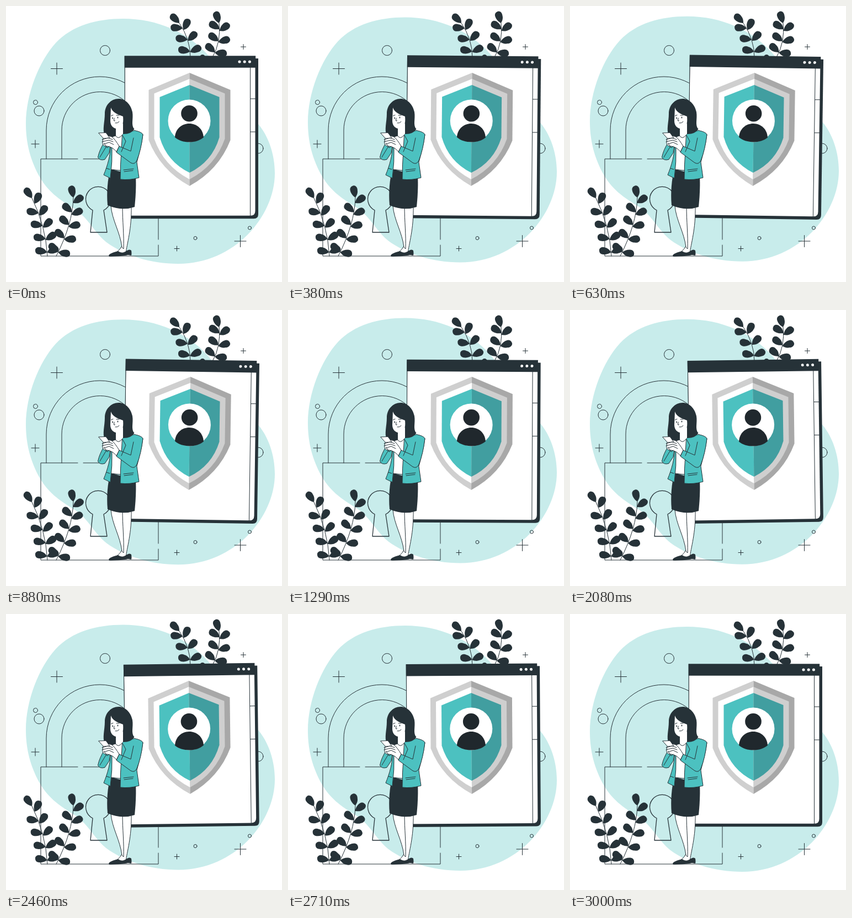
An HTML page that plays this animation: 500 by 500 pixels, repeating every 3.04 s.

```html
<!DOCTYPE html>
<html lang="en">
<head>
<meta charset="utf-8">
<title>Account security</title>
<style>
  html, body { margin: 0; width: 100%; height: 100%; overflow: hidden; background: #fff; }
  svg { display: block; width: 100vw; height: 100vh; }
  .line, .skin, .coat { stroke: #263238; stroke-width: 1; stroke-linecap: round; stroke-linejoin: round; }
  .line { fill: none; }
  .skin { fill: #fff; }
  .coat { fill: #4cc1c0; }
  .dark { fill: #263238; }
</style>
</head>
<body>
<svg viewBox="0 0 500 500">
  <defs>
    <path id="leaf" class="dark" d="M0 0C4-4 9-7 15-7C20-7 22-3 22 1C21 5 17 7 12 6C7 6 3 3 0 0Z"/>
  </defs>

  <path id="blob" fill="#c8eceb" d="M36 213C36 160 60 100 90 67C120 35 165 23 212 23C275 23 330 48 367 90C395 125 430 185 457 214C475 235 487 268 487 303C487 380 415 467 312 467C262 467 215 452 182 428C158 408 150 385 125 368C95 350 75 335 60 308C45 280 36 250 36 213Z"/>

  <g id="marks" class="line"></g>

  <g class="line">
    <path d="M130 277H63V453H276V433M276 423V380M140 277H176"/>
    <path d="M73 277V225A97 97 0 0 1 267 225M101 277V225A69.500 69.500 0 0 1 240 225"/>
    <path stroke-width="1.3" d="M157 370A22.500 22.500 0 1 1 177 370L183 410H153Z"/>
  </g>

  <g id="plants"></g>
  <circle class="dark" cx="356" cy="93" r="5"/>

  <g id="window">
    <path class="dark" d="M215 95H457V377Q457 385.300 449 385.300H215Z"/>
    <path fill="#fff" d="M215.500 110H451.500V371Q451.500 379.800 443 379.800H215.500Z"/>
    <path class="line" d="M215.200 91V384M442.500 111V380M442.500 168H452M442.500 228H452"/>
    <rect class="dark" x="214.700" y="90.300" width="237.500" height="21.400"/>
    <g id="dots" fill="#fff"></g>
    <g id="shield"></g>
    <circle cx="332" cy="208" r="38.500" fill="#fff"/>
    <g fill="#20282d">
      <circle cx="332" cy="194.800" r="14.800"/>
      <path d="M306 238C307 222 319 213 332 213S357 222 358 238C351 244 342 246.500 332 246.500S313 244 306 238Z"/>
    </g>
  </g>

  <g id="woman">
    <g id="legs">
      <path class="skin" d="M208 364C208 388 214 410 212 430Q208 441 199 447L217 449C219 430 228 405 227 362Z"/>
      <path class="skin" d="M190 362C192 388 207 410 210 437L213 440C214 415 211 390 211 362Z"/>
      <path class="dark" d="M186 452C188 448 196 446 203 444Q210 449 216 445Q224 439 227 443Q228 449 227 452L221 451C214 453 196 454 187 454Z"/>
    </g>
    <path class="dark" d="M189 295L235 308C236 325 235 345 233 364Q210 372 184 361C182 338 184 315 189 295Z"/>
    <g id="jacket">
      <path class="skin" d="M191 240L198 230L212 229L218 250L208 298L189 296Z"/>
      <path class="coat" d="M178 247Q169 261 166.500 274Q170 281 179 278L187 266L189 251Z"/>
      <path class="coat" d="M190 252C189 271 184 289 177 306L189 312Q193 282 192 253Z"/>
      <path class="coat" d="M211 230Q225 227 233 225.500Q246 228 248 233C246 250 241 268 237 283L241 311Q224 316 207 314Q207 288 209 262Z"/>
      <path class="coat" d="M248 233Q245 260 237 280Q233 288 226 284L200 265L205 254L226 263L231 239"/>
      <path class="line" d="M213 297L231 295M214 300L230 298M182 294L188 296M170 274L182 254M211 234L217 245L209 264"/>
    </g>
    <g id="head">
      <path class="dark" d="M204 168C190 168 179 180 179 195C179 210 174 225 179 234Q186 241 197 236L213 232Q227 232 232.500 223C226 216 231 205 229 192C226 178 216 168 204 168Z"/>
      <path fill="#fff" d="M199 219L212 213V231Q207 243 199 240Z"/>
      <path fill="#fff" d="M190 184C193 193 203 197 212 200Q214 221 203 222C196 223 189 218 189 208Z"/>
      <path class="line" d="M198 234Q203 244 211 233M190.500 199L194 197.500M200 198L205 198M196 203L195.500 208H197.500M198 212Q202 213 205 209.500"/>
      <ellipse class="dark" cx="193" cy="203" rx=".9" ry="1.500"/>
      <ellipse class="dark" cx="202.500" cy="202" rx=".9" ry="1.500"/>
    </g>
    <g id="hands">
      <path class="skin" d="M176 240Q184 233 192 237Q198 242 205 254L200 264Q193 255 183 254Q176 255 175 249Z"/>
      <path class="skin" d="M168 230L181 229.500L188 239L177 240Z"/>
      <path class="line" d="M174 242L185 239L193 242M174 246L186 243L194 246M177 250L187 247L195 251M178 249L183 257L187 254"/>
    </g>
  </g>
</svg>
<script>
const PERIOD = 3000, LOOP = 3040;
const $ = id => document.getElementById(id);
const repeat = (n, fn) => Array.from({ length: n }, (_, i) => fn(i)).join('');

const plus = (x, y, r) => `<path d="M${x - r} ${y}h${2 * r}M${x} ${y - r}v${2 * r}"/>`;
const ring = (x, y, r) => `<circle cx="${x}" cy="${y}" r="${r}"/>`;

// One half of a shield layer; each layer is inset evenly from the one outside it.
function shieldHalf(layer, side, color) {
  const x = half => 332.5 + side * half;
  const width = 74 - 10 * layer;
  return `<path fill="${color}" d="M332.5 ${121 + 11 * layer}L${x(width)} ${152 + 6.5 * layer}` +
    `V${243 - 2.5 * layer}Q${x(53 - 6 * layer)} ${297 - 7.5 * layer} 332.5 ${326 - 12 * layer}Z"/>`;
}

// A stem is a quadratic curve from root through bend to tip, with leaves in pairs that close towards the tip.
function plant(root, bend, tip, pairs, first, step) {
  const at = t => [0, 1].map(k =>
    (1 - t) ** 2 * root[k] + 2 * t * (1 - t) * bend[k] + t * t * tip[k]);
  const heading = t => {
    const [dx, dy] = [0, 1].map(k => (1 - t) * (bend[k] - root[k]) + t * (tip[k] - bend[k]));
    return Math.atan2(dy, dx) * 180 / Math.PI;
  };
  const leaf = ([x, y], angle) =>
    `<use href="#leaf" transform="translate(${x} ${y}) rotate(${angle})"/>`;
  const pair = i => {
    const t = first + step * i, spread = 75 - 25 * t;
    const left = t < 0.85 ? leaf(at(t * 1.06), heading(t) - spread) : '';
    return left + leaf(at(t), heading(t) + spread);
  };
  return `<path class="line" d="M${root}Q${bend} ${tip}"/>` +
    repeat(pairs, pair) + leaf(tip, heading(1.3));
}

$('marks').innerHTML =
  plus(92, 113.5, 10.5) + plus(424.5, 426, 10.5) + plus(53, 250, 7) +
  plus(430, 74, 4.5) + plus(309.5, 439.5, 4.5) +
  ring(179.5, 80.5, 9) + ring(60, 190, 9) + ring(457, 258, 9) +
  ring(53.5, 174.5, 4) + ring(343, 420.5, 3) + ring(441.5, 402, 3);

$('plants').innerHTML =
  plant([75, 453], [72, 398], [47, 348], 5, 0.06, 0.21) +
  plant([91, 453], [121, 395], [122, 347], 5, 0.06, 0.21) +
  plant([334, 93], [334, 60], [314, 31], 3, 0.15, 0.32) +
  plant([374, 93], [390, 65], [386, 31], 3, 0.15, 0.32);

$('dots').innerHTML = repeat(3, i => ring(423 + 9.2 * i, 101, 2.5));

const lit = ['#cfcfcf', '#fff', '#4cc1c0'], shaded = ['#a8a8a8', '#cfcfcf', '#419ea0'];
$('shield').innerHTML = repeat(3, i => shieldHalf(i, -1, lit[i]) + shieldHalf(i, 1, shaded[i]));

// Triangle wave: 0 at whole phases, 1 at half phases.
const triangle = p => 1 - Math.abs(2 * (p - Math.floor(p)) - 1);

function render(ms) {
  const phase = Math.min(ms % LOOP, PERIOD) / PERIOD;
  const tilt = 2 * triangle(phase + 0.25) - 1;
  $('blob').setAttribute('transform', `translate(0 ${-10 * triangle(phase)})`);
  $('window').setAttribute('transform', `rotate(${tilt} 335.5 237.5)`);
}

function tick() {
  render(performance.now());
  requestAnimationFrame(tick);
}
tick();
</script>
</body>
</html>
```
